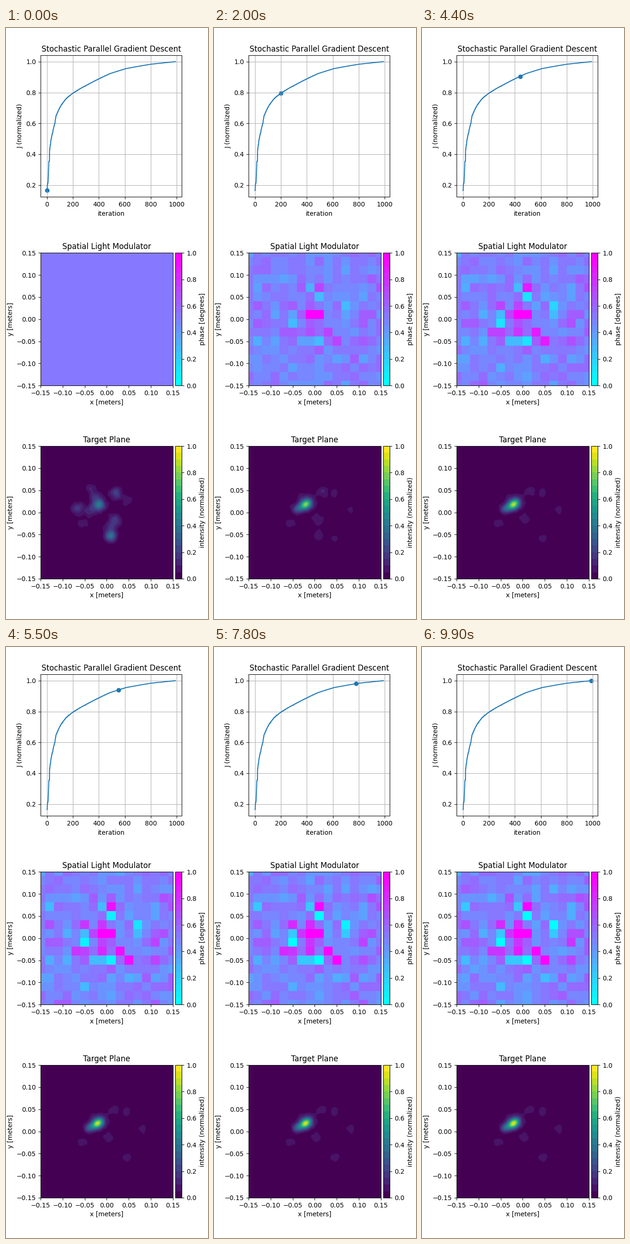
A matplotlib script for the animation above (10 s loop, 438 by 1278 pixels).

```python
import numpy as np
import matplotlib.pyplot as plt
from matplotlib.animation import FuncAnimation

W, H, DPI = 438, 1278, 100
FRAMES, STEP = 100, 10
LEVELS = 20
LIM = 0.15
LEFT, SIDE, GAP = 74.9, 287, 5
BAR = SIDE * 0.05

plt.rcParams.update({"font.family": "DejaVu Sans", "font.size": 10})
rng = np.random.default_rng(7)


# ---- objective curve: a few knots joined in sqrt(iteration), slightly stepped
KNOTS = np.array([(0, .165), (9, .225), (18, .41), (32, .497), (60, .60),
                  (70, .65), (107, .715), (150, .763), (200, .796),
                  (338, .862), (484, .922), (608, .955), (800, .9835),
                  (990, 1)])
iters = np.arange((FRAMES - 1) * STEP + 1)
accepted = rng.random(iters.size) < 0.6
accepted[::STEP] = True
held = np.maximum.accumulate(np.where(accepted, iters, 0))
J = np.interp(np.sqrt(held), np.sqrt(KNOTS[:, 0]), KNOTS[:, 1])


def progress(frame):
    return (J[frame * STEP] - J[0]) / (1 - J[0])


# ---- modulator: random phases plus strong cells (row, column) by final drive
N = 16
STRONG = {
    1.8: [(7, 7), (7, 8)],
    1.05: [(4, 8), (9, 9), (10, 10)],
    0.82: [(6, 5), (6, 7), (7, 6), (8, 7), (8, 13), (9, 4), (9, 5), (9, 7)],
    0.22: [(4, 1), (4, 7), (7, 5), (7, 11), (10, 6), (10, 7)],
    0.0: [(5, 8), (6, 11), (8, 5), (10, 8)],
}
drive = 0.5 + rng.normal(0, 0.07, (N, N))
pace = np.full((N, N), 0.6)
for value, cells in STRONG.items():
    for cell in cells:
        drive[cell] = value
        pace[cell] = 3  # strong cells keep travelling to the end

walk = np.cumsum(rng.normal(0, 0.004, (FRAMES, N, N)), axis=0)
walk -= walk[0]


def modulator(frame):
    phase = 0.5 + (drive - 0.5) * progress(frame) ** pace + walk[frame]
    return np.clip(phase, 0, 1)


# ---- target plane, in millimetres
RES = 574
axis = (np.arange(RES) + 0.5) / RES * 300 - 150
X, Y = np.meshgrid(axis, -axis)


def lobe(x, y, height, sx=9, sy=None, tilt=0):
    sy = sy or sx
    c, s = np.cos(np.radians(tilt)), np.sin(np.radians(tilt))
    dx, dy = X - x, Y - y
    u, v = (c * dx + s * dy) / sx, (c * dy - s * dx) / sy
    return height * np.exp(-(u * u + v * v) / 2)


def speckle(waves=24):
    total = np.zeros_like(X)
    for _ in range(waves):
        angle, shift = rng.uniform(0, 2 * np.pi, 2)
        k = 2 * np.pi / rng.uniform(13, 34)
        total += np.cos(k * (X * np.cos(angle) + Y * np.sin(angle)) + shift)
    return total * np.sqrt(2 / waves)


grain = speckle()


def ragged(smooth):
    """Roughen the faint parts and leave the bright ones smooth."""
    return smooth * (1 + 0.2 * grain * np.exp(-smooth / 0.15))


SPOTS = [(-18, 18, .4), (-27, 38, .11), (-38, 4, .12), (-67, 9, .18),
         (21, 44, .2), (9, -53, .36), (20, -18, .17), (8, -34, .1),
         (48, 26, .08), (-55, -26, .07), (-38, 58, .07)]
PATCHES = [(45, 45), (46, -59), (-55, -25), (2, -14), (80, 5), (15, 50)]

scattered = ragged(sum(lobe(*spot) for spot in SPOTS)
                   + lobe(-10, 5, 0.03, 38))
focused = ragged(lobe(-21, 18, 0.84, 10, 7, 35)
                 + lobe(-40, 8, 0.27, 7)
                 + lobe(-20, 22, 0.11, 17, 14)
                 + sum(lobe(x, y, 0.085) for x, y in PATCHES))


def intensity(frame):
    mix = scattered + (focused - scattered) * progress(frame)
    return np.clip(mix, 0, 1)


# ---- figure
fig = plt.figure(figsize=(W / DPI, H / DPI), dpi=DPI, facecolor="white")


def panel(left, top, width, height):
    return fig.add_axes([left / W, 1 - (top + height) / H,
                         width / W, height / H])


def plane(top, data, half, cmap, title, label, **kw):
    ax = panel(LEFT, top, SIDE, SIDE)
    im = ax.imshow(data, extent=(-half, half, -half, half), vmin=0, vmax=1,
                   cmap=plt.get_cmap(cmap, LEVELS), aspect="auto", **kw)
    ticks = np.linspace(-LIM, LIM, 7)
    ax.set(xlim=(-LIM, LIM), ylim=(-LIM, LIM), xticks=ticks, yticks=ticks,
           xlabel="x [meters]", ylabel="y [meters]", title=title)
    ax.xaxis.set_major_formatter("{x:.2f}")
    ax.yaxis.set_major_formatter("{x:.2f}")
    bar = fig.colorbar(im, cax=panel(LEFT + SIDE + GAP, top, BAR, SIDE),
                       ticks=np.linspace(0, 1, 6))
    bar.set_label(label)
    return im


full = SIDE + GAP + BAR
ax = panel(LEFT, 58.9, full, full)
ax.plot(iters, J, color="C0")
dot = ax.scatter([0], [J[0]], color="C0")
ax.grid(True)
pad = 0.05 * (1 - J[0])
ax.set(xlim=(-49.5, 1039.5), ylim=(J[0] - pad, 1 + pad),
       xticks=range(0, 1001, 200), yticks=[0.2, 0.4, 0.6, 0.8, 1.0],
       xlabel="iteration", ylabel="J (normalized)",
       title="Stochastic Parallel Gradient Descent")

slm = plane(486.3, modulator(0), 0.16, "cool", "Spatial Light Modulator",
            "phase [degrees]", interpolation="nearest")
spot = plane(904, intensity(0), LIM, "viridis", "Target Plane",
             "intensity (normalized)", interpolation_stage="rgba")


def update(frame):
    dot.set_offsets([(frame * STEP, J[frame * STEP])])
    slm.set_data(modulator(frame))
    spot.set_data(intensity(frame))
    return dot, slm, spot


anim = FuncAnimation(fig, update, frames=FRAMES, interval=100,
                     repeat=True, repeat_delay=0, blit=False)
plt.show()
```
